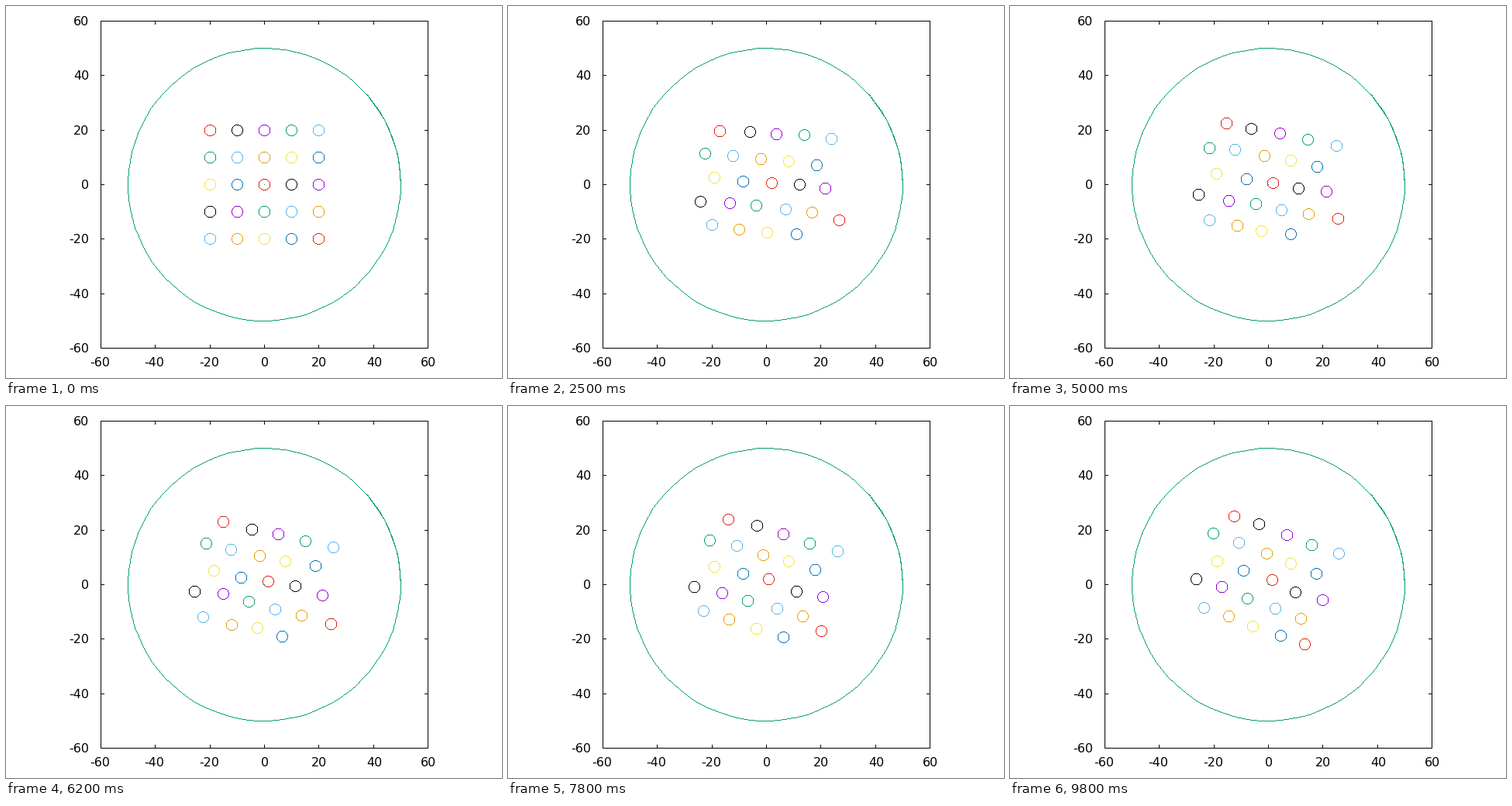
A matplotlib script that plays this animation: 640 by 480 pixels, repeating every 9900 ms.

```python
import numpy as np
import matplotlib.pyplot as plt
from matplotlib.animation import FuncAnimation
from matplotlib.colors import to_rgb

W, H, DPI = 640, 480, 100
FRAMES, INTERVAL = 99, 100
LEFT, TOP, SIDE = 122, 19, 422
RIGHT, BOTTOM = LEFT + SIDE, TOP + SIDE
CENTER = np.array([LEFT + SIDE / 2, TOP + SIDE / 2])
UNIT = SIDE / 120

BLACK, GREEN = "#000000", "#009e73"
CYCLE = ["#56b4e9", "#e69f00", "#f0e442", "#0072b2",
         "#e51e10", BLACK, "#9400d3", GREEN]

# Lattice indices, row by row from the bottom left.
ROW, COL = (k.ravel() for k in np.mgrid[-2:3, -2:3])
LOOSE = 4  # the bottom right particle swings away and back
HEX_STEP = 36
SETTLE = 9  # frames
SPIN = np.radians(0.205)  # clockwise, per frame
DRIFT = np.array([-0.065, 0.085])  # pixels per frame
SWING = np.array([25, 28])

rng = np.random.default_rng(7)
RATES = rng.uniform(0.1, 0.7, (4, 25, 2))
PHASES = rng.uniform(0, 2 * np.pi, (4, 25, 2))


def stroke(canvas, points, color):
    """Draw a one-pixel polyline without antialiasing."""
    rgb = np.rint(np.array(to_rgb(color)) * 255)
    points = np.rint(points).astype(int)
    for a, b in zip(points, points[1:]):
        count = np.abs(b - a).max() + 1
        x, y = np.rint(np.linspace(a, b, count)).astype(int).T
        canvas[y, x] = rgb


def arc(radius, angles):
    return radius * np.column_stack([np.cos(angles), -np.sin(angles)])


def positions(i):
    """The square lattice relaxes to a hexagonal one that turns and drifts."""
    ease = 1 - np.exp(-i / SETTLE)
    square = 10 * UNIT
    step = square + (HEX_STEP - square) * ease
    rise = square + (HEX_STEP * np.sqrt(3) / 2 - square) * ease
    shift = np.where(ROW % 2 == 0, 1, -1) * HEX_STEP / 4 * ease
    x, y = COL * step + shift, ROW * rise
    c, s = np.cos(SPIN * i), np.sin(SPIN * i)
    pos = np.column_stack([c * x + s * y, c * y - s * x]) + DRIFT * i
    pos += ease * np.sin(RATES * i + PHASES).sum(axis=0)
    pos[LOOSE] += SWING * np.sin(np.pi * i / (FRAMES - 1))
    return CENTER + pos * (1, -1)


def draw_stage():
    canvas = np.full((H, W, 3), 255, np.uint8)
    stroke(canvas, [(LEFT, TOP), (RIGHT, TOP), (RIGHT, BOTTOM),
                    (LEFT, BOTTOM), (LEFT, TOP)], BLACK)
    for value in range(-60, 61, 20):
        x, y = np.rint(CENTER + value * UNIT * np.array([1, -1]))
        for a, b in ((TOP, TOP + 4), (BOTTOM - 4, BOTTOM)):
            stroke(canvas, [(x, a), (x, b)], BLACK)
        for a, b in ((LEFT, LEFT + 4), (RIGHT - 4, RIGHT)):
            stroke(canvas, [(a, y), (b, y)], BLACK)
    # The wall runs past a full turn, so its ends overlap slightly.
    stroke(canvas, CENTER + arc(50 * UNIT, np.linspace(0, 7, 100)), GREEN)
    stroke(canvas, [CENTER, CENTER], GREEN)
    return canvas


def draw_labels():
    style = dict(family="DejaVu Sans", size=16 * 72 / DPI, va="baseline")
    for value in range(-60, 61, 20):
        x, y = np.rint(CENTER + value * UNIT * np.array([1, -1]))
        nudge = 1 if value >= 0 else -1
        ax.text(x + nudge, 465, str(value), ha="center", **style)
        ax.text(107, y + 6, str(value), ha="right", **style)


fig = plt.figure(figsize=(W / DPI, H / DPI), dpi=DPI, facecolor="white")
ax = fig.add_axes([0, 0, 1, 1])
ax.axis("off")
STAGE = draw_stage()
RING = arc(2 * UNIT, np.linspace(0, 2 * np.pi, 25))
picture = ax.imshow(STAGE, extent=(0, W, H, 0), aspect="auto",
                    interpolation="nearest")
draw_labels()


def update(i):
    canvas = STAGE.copy()
    for k, center in enumerate(np.rint(positions(i))):
        stroke(canvas, center + RING, CYCLE[k % len(CYCLE)])
    picture.set_data(canvas)
    return [picture]


anim = FuncAnimation(fig, update, frames=FRAMES, interval=INTERVAL,
                     repeat=True, repeat_delay=0, blit=False)
plt.show()
```
